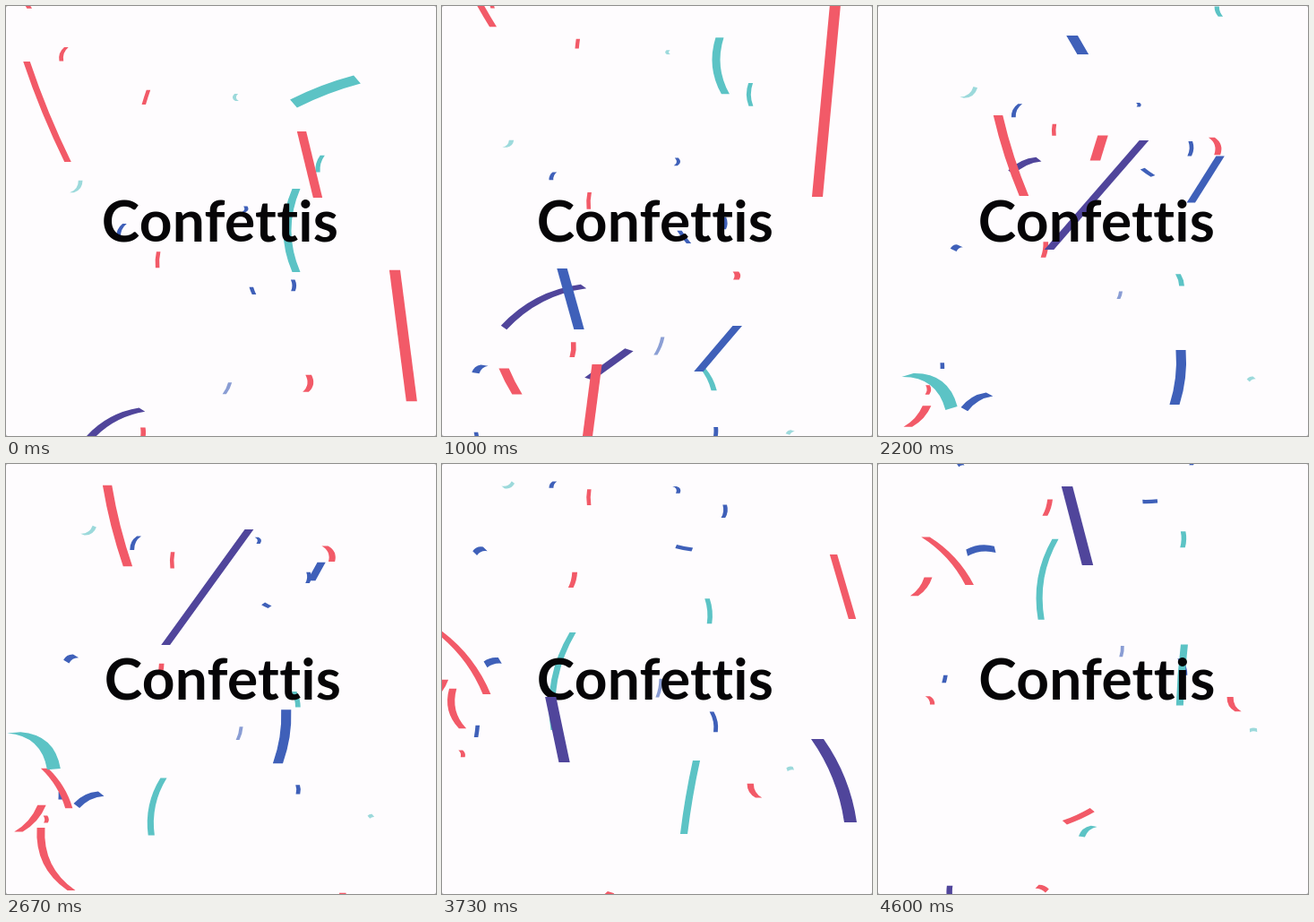
These frames come from a looping animation (480x480 px, 4.67 s). An HTML page:

```html
<!DOCTYPE html>
<html lang="en">
<head>
<meta charset="utf-8">
<title>Confettis</title>
<style>
html, body { margin: 0; width: 100%; height: 100%; overflow: hidden; background: #aaa; }
svg { display: block; width: 100vw; height: 100vh; background: #fefcfe; border-radius: 2px; }
text {
  font: 700 64px Lato, "Open Sans", sans-serif;
  font-variant-ligatures: none;
  letter-spacing: 0.3px;
  text-anchor: middle;
  fill: #060507;
}
</style>
</head>
<body>
<svg viewBox="0 0 480 480">
  <g id="back"></g>
  <text id="word" x="239" y="263">Confettis</text>
  <g id="front"></g>
</svg>
<script>
const LOOP = 4670, TICKS = 70, LIFE = 20, SMALL = 27;
const R = '#f25a68', T = '#5cc3c5', B = '#3f60b9', I = '#50459b';
const palette = [R, R, R, B, B, I, T];
const beats = [0, 15, 22, 33, 40, 56, 69];
const centers = [239, 238, 242, 244, 242, 238, 244.5];
const word = document.getElementById('word');
const back = document.getElementById('back');
const front = document.getElementById('front');
const ribbons = [];

let seed = 11;
function rand(lo, hi) {
  seed = (seed * 1664525 + 1013904223) % 4294967296;
  return lo + (hi - lo) * seed / 4294967296;
}

// Camera sway: moves the word, and near ribbons more than far ones.
function sway(t) {
  let i = 0;
  while (i < beats.length - 2 && t > beats[i + 1]) i++;
  const k = (t - beats[i]) / (beats[i + 1] - beats[i]);
  return centers[i] + (centers[i + 1] - centers[i]) * (1 - Math.cos(Math.PI * k)) / 2;
}

const riseOf = w => 1.75 * (Math.min(w, 12) - 2);

function add(color, ribbon) {
  const el = document.createElementNS('http://www.w3.org/2000/svg', 'path');
  el.setAttribute('fill', color);
  if (ribbon.w < 4) el.setAttribute('opacity', 0.6);
  (ribbon.w > 10 ? front : back).append(el);
  ribbons.push({ el, ...ribbon });
}

// A large ribbon, given by its two ends at one tick.
function large(color, at, x0, y0, x1, y1, w, bend = 0) {
  add(color, {
    at, w, bend,
    x: (x0 + x1) / 2, y: (y0 + y1) / 2,
    angle: Math.atan2(y1 - y0, x1 - x0),
    len: Math.hypot(x1 - x0, y1 - y0),
    spin: rand(-0.015, 0.015),
    flip: dt => Math.max(0, 1 - (dt / LIFE) ** 4)
  });
}

// A small ribbon that tumbles upward through the whole loop.
function small() {
  const w = rand(3.7, 7.5), phase = rand(0, Math.PI);
  add(palette[Math.floor(rand(0, palette.length))], {
    at: 0, w,
    x: rand(-10, 490), y: rand(0, 490 + riseOf(w) * TICKS),
    angle: rand(0.8, 2.4), len: rand(2, 6) * w, bend: rand(-4, 4),
    spin: rand(-0.02, 0.02),
    flip: dt => 0.4 + 0.6 * Math.abs(Math.cos(phase + dt * 0.08))
  });
}

function outline(r, t) {
  const dt = t - r.at, s = r.flip(dt);
  if (!s) return '';
  const x = r.x + 1.2 * r.w * (sway(t) - sway(r.at));
  const y = r.y - riseOf(r.w) * dt;
  const a = r.angle + r.spin * dt, dx = Math.cos(a), dy = Math.sin(a);
  const hx = dx * r.len * s / 2, hy = dy * r.len * s / 2;
  const cx = x + 2 * r.bend * s * dy, cy = y - 2 * r.bend * s * dx;
  // Ends are cut level on steep ribbons and upright on flat ones.
  const skew = dx * dy / Math.max(dx * dx, dy * dy);
  const ox = r.w / 2 * (dy + skew * dx), oy = r.w / 2 * (skew * dy - dx);
  const pt = (px, py, side) => (px + side * ox).toFixed(2) + ' ' + (py + side * oy).toFixed(2);
  return `M${pt(x - hx, y - hy, 1)}Q${pt(cx, cy, 1)} ${pt(x + hx, y + hy, 1)}` +
    `L${pt(x + hx, y + hy, -1)}Q${pt(cx, cy, -1)} ${pt(x - hx, y - hy, -1)}Z`;
}

for (let i = 0; i < SMALL; i++) small();

large(R, 0, 23, 62, 69, 174, 7, -2);
large(T, 0, 321, 109, 392, 82, 11, 2);
large(R, 0, 330, 140, 348, 214, 10);
large(T, 0, 324, 204, 324, 297, 9, -10);

large(R, 15, 439, -2, 419, 213, 12);
large(B, 15, 134, 293, 153, 361, 11);
large(I, 15, 69, 359, 158, 313, 7, 9);
large(R, 15, 173, 400, 162, 484, 11);
large(B, 22, 367, 282, 326, 336, 8);

large(R, 33, 134, 122, 163, 212, 10, -2);
large(I, 33, 297, 150, 191, 272, 8);
large(T, 33, 33, 412, 82, 449, 11, 12);
large(B, 33, 338, 384, 331, 445, 11, 3);
large(R, 40, 39, 406, 73, 476, 8, -11);

large(R, 56, 437, 101, 458, 173, 8);
large(R, 56, -4, 187, 50, 257, 7, 6);
large(T, 56, 146, 188, 125, 297, 7, -10);
large(I, 56, 419, 307, 456, 400, 13, 6);
large(T, 56, 284, 331, 270, 413, 8, -1);
large(I, 69, 211, 25, 234, 113, 12);

let shown = -1;
const start = performance.now();

function draw(now) {
  const ms = Math.max(0, now - start) % LOOP;
  const t = Math.floor(ms / LOOP * TICKS + 0.2) % TICKS;
  if (t !== shown) {
    shown = t;
    word.setAttribute('x', sway(t).toFixed(2));
    for (const r of ribbons) r.el.setAttribute('d', outline(r, t));
  }
  requestAnimationFrame(draw);
}
draw(start);
</script>
</body>
</html>
```
